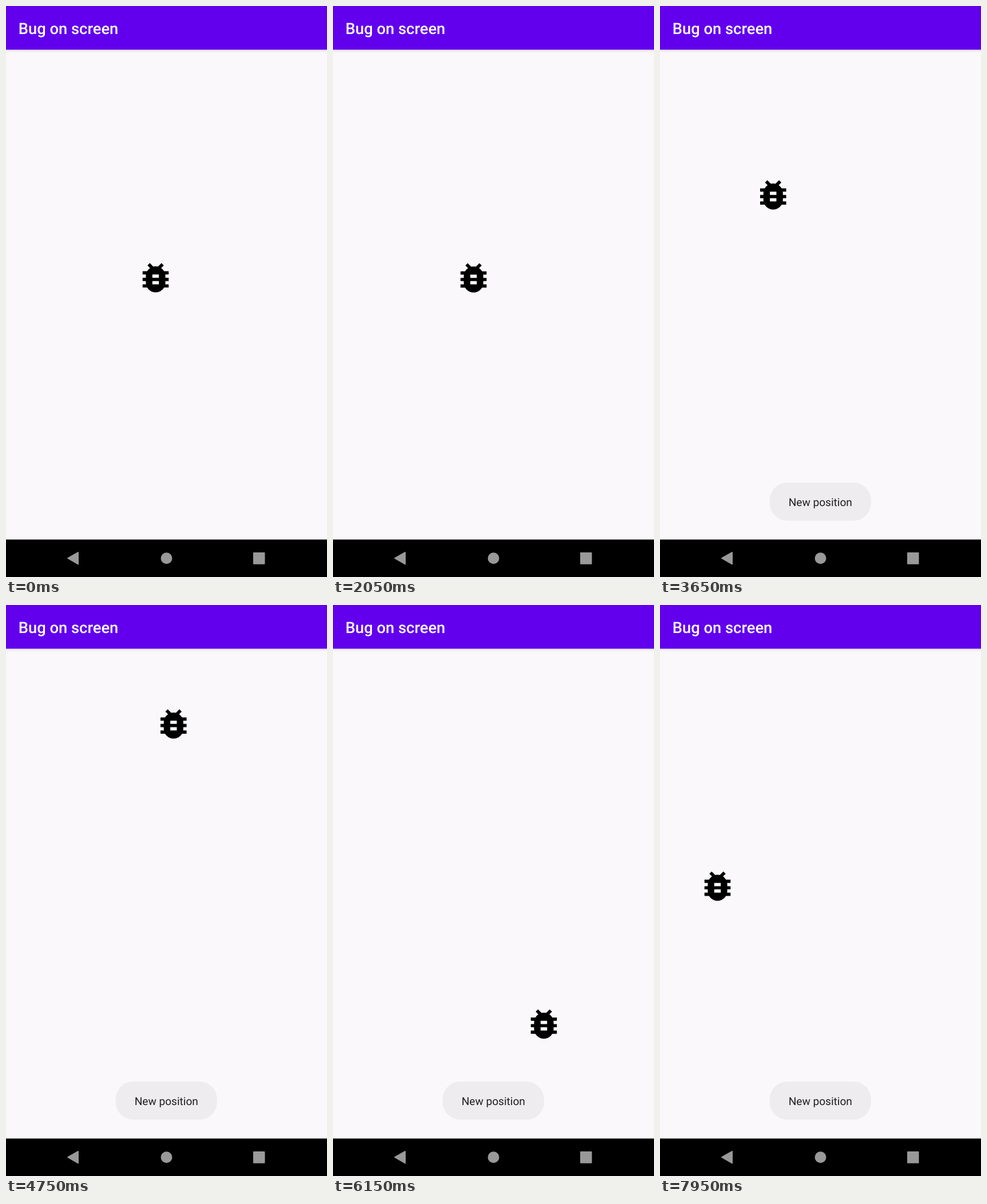
Animation, 561 px wide and 998 px high, one loop 8000 ms. Source, as an HTML page:

```html
<!DOCTYPE html>
<html lang="en">
<head>
<meta charset="utf-8">
<title>Bug on screen</title>
<style>
  html, body { margin: 0; width: 100%; height: 100%; overflow: hidden; background: #faf8fb; }
  svg { display: block; width: 100%; height: 100%; }
  text { font-family: Roboto, sans-serif; text-rendering: geometricPrecision; }
</style>
</head>
<body>
<svg viewBox="0 0 561 998">
  <defs>
    <linearGradient id="shade" x2="0" y2="1">
      <stop offset="0" stop-color="#000" stop-opacity=".08"/>
      <stop offset="1" stop-color="#000" stop-opacity="0"/>
    </linearGradient>
    <g id="toast">
      <rect x="191.5" y="833" width="177.5" height="66.5" rx="31" fill="#eeecef"/>
      <text x="280.3" y="873.7" font-size="19.1" text-anchor="middle" fill="#1f1f1f">New position</text>
    </g>
  </defs>

  <rect width="561" height="998" fill="#faf8fb"/>
  <rect y="76" width="561" height="6" fill="url(#shade)"/>
  <rect width="561" height="76.4" fill="#6200ee"/>
  <text x="21.8" y="49" font-size="27.3" font-weight="500" fill="#fff">Bug on screen</text>

  <!-- Drawn around its centre on a 24-unit icon grid. -->
  <g id="bug" fill="none" stroke="#000" stroke-width="2">
    <rect x="-6" y="-7" width="12" height="16" rx="6" fill="#000" stroke="none"/>
    <path d="M-8-3H8M-8 1H8M-8 5H8"/>
    <path d="M-4.3-8.3l3 3M4.3-8.3l-3 3"/>
    <path d="M-2-1h4M-2 3h4" stroke="#faf8fb"/>
  </g>

  <use id="oldToast" href="#toast"/>
  <use id="newToast" href="#toast"/>

  <rect y="932.5" width="561" height="66" fill="#000"/>
  <g fill="#999" stroke="#999" stroke-width="2" stroke-linejoin="round">
    <path d="M108.2 965.2 126 955v20.5z"/>
    <circle cx="280.5" cy="965.3" r="9"/>
    <rect x="433" y="956" width="18.5" height="18.7"/>
  </g>
</svg>
<script>
  const LOOP = 8000, STEP = 50;
  const ICON_SCALE = 2.845;
  const TOAST_START = 2750, TOAST_PERIOD = 2100, TOAST_FADE = 500;

  // Each drag ends at (x, y); bulge bends its path outwards, relative to its length.
  const home = { x: 261.5, y: 475 };
  const drags = [
    { start: 1900, end: 2550, x: 144, y: 476, bulge: 0 },
    { start: 3400, end: 3900, x: 287, y: 203, bulge: 0.13 },
    { start: 4700, end: 5350, x: 381, y: 557.3, bulge: 0.36 },
    { start: 5700, end: 6400, x: 248.5, y: 688.6, bulge: 1.5 },
    { start: 6900, end: 7400, x: 125, y: 513, bulge: 0.3 },
    { start: 7700, end: 7950, x: 100.5, y: 491.4, bulge: 0.2 },
  ];

  const byId = id => document.getElementById(id);
  const bug = byId("bug"), oldToast = byId("oldToast"), newToast = byId("newToast");

  function ease(t, start, end) {
    const p = Math.min(1, Math.max(0, (t - start) / (end - start)));
    return p * p * (3 - 2 * p);
  }

  function bugPosition(t) {
    let { x, y } = home;
    for (const drag of drags) {
      const p = ease(t, drag.start, drag.end);
      const dx = drag.x - x, dy = drag.y - y;
      const bend = 2 * p * (1 - p) * drag.bulge;
      x += dx * p + dy * bend;
      y += dy * p - dx * bend;
      if (p < 1) break;
    }
    return [x, y];
  }

  function draw(t) {
    bug.setAttribute("transform", `translate(${bugPosition(t)}) scale(${ICON_SCALE})`);

    // Each toast fades in while the one before it fades out.
    const index = Math.floor((t - TOAST_START) / TOAST_PERIOD);
    const shownAt = TOAST_START + index * TOAST_PERIOD;
    const fade = index < 0 ? 0 : ease(t, shownAt, shownAt + TOAST_FADE);
    newToast.setAttribute("opacity", fade);
    oldToast.setAttribute("opacity", index > 0 ? 1 - fade : 0);
  }

  const origin = performance.now();
  function tick() {
    const t = (performance.now() - origin) % LOOP;
    draw(Math.floor(t / STEP) * STEP);
    requestAnimationFrame(tick);
  }
  tick();
</script>
</body>
</html>
```
